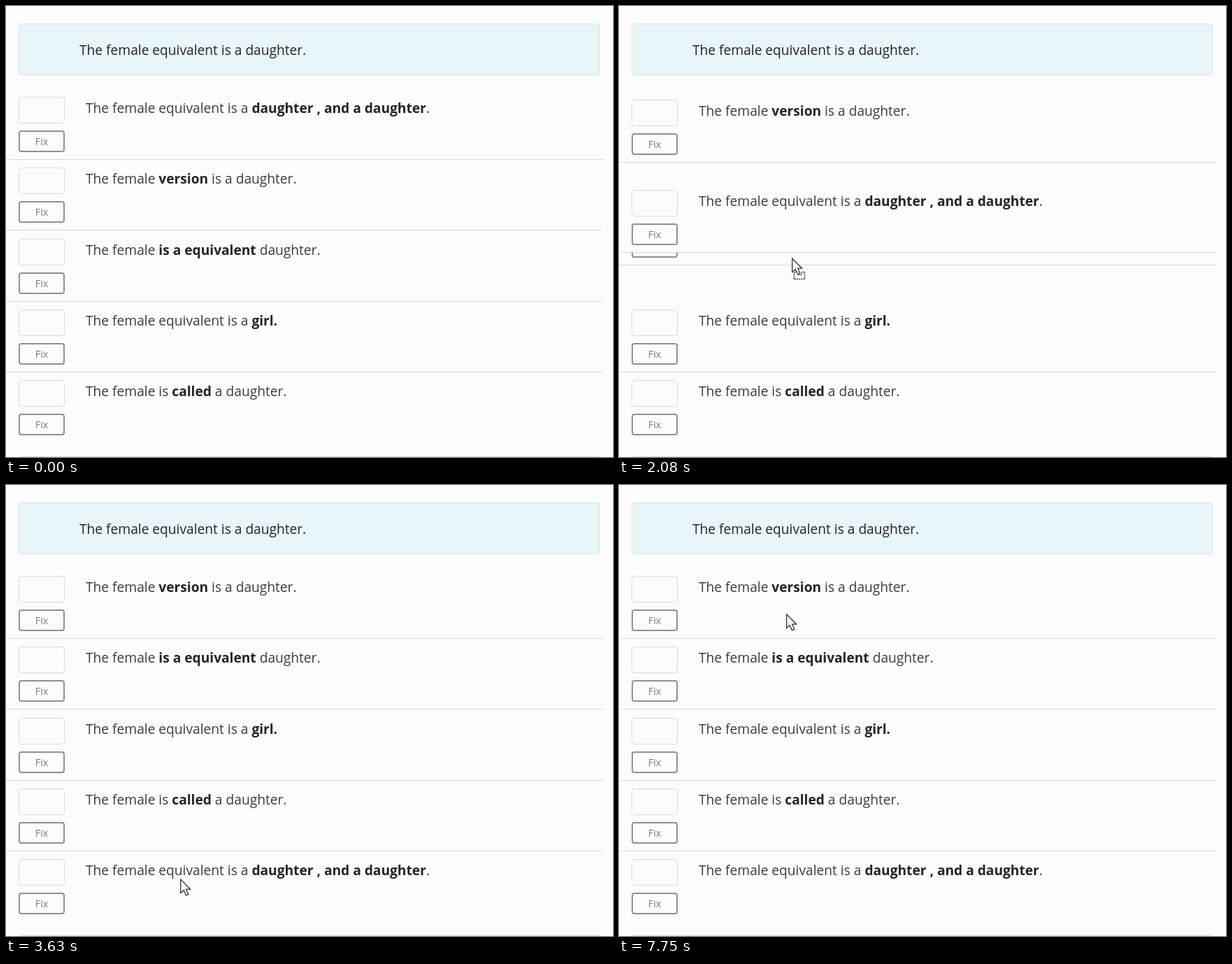
These frames come from a looping animation (868 px wide and 645 px high, 8 s). An HTML page:

```html
<!DOCTYPE html>
<html lang="en">
<head>
<meta charset="utf-8">
<title>Sortable sentences</title>
<style>
  html, body { margin: 0; width: 100%; height: 100%; overflow: hidden; background: #fcfcfc; }
  #stage {
    position: relative; width: 868px; height: 645px; overflow: hidden;
    font: 19.17px/28px "Open Sans", "Noto Sans", sans-serif; color: #3a3d41; white-space: pre;
  }
  #stage * { position: absolute; box-sizing: border-box; }
  #stage b { position: static; color: #212529; }
  .panel {
    left: 18px; top: 25px; width: 831px; height: 74px;
    background: #e8f6f9; border: 1px solid #d9dfea; border-radius: 4px;
  }
  .panel span { left: 86px; top: 23px; color: #212529; }
  .row {
    left: 0; top: 119px; width: 854px; height: 101px;
    background: #fcfcfc; border-bottom: 1px solid #d9d9d9;
  }
  .row.last { border-color: transparent; }
  .row span { left: 114px; top: 13px; }
  .row i, .row u { left: 18px; width: 66px; border-radius: 4px; }
  .row i { top: 11px; height: 38px; border: 1px solid #d8d9e6; }
  .row u {
    top: 59px; height: 31px; border: 2px solid #8d9097;
    font-size: 14.3px; line-height: 28px; color: #7c7c7c; text-align: center; text-decoration: none;
  }
  .end { left: 20px; top: 644px; width: 828px; height: 1px; background: #d8d8d6; }
  #cursor { left: 0; top: 0; z-index: 2; overflow: visible; }
</style>
</head>
<body>
<div id="stage">
  <div class="panel"><span>The female equivalent is a daughter.</span></div>
  <div class="end"></div>
  <svg id="cursor" width="20" height="32">
    <path id="arrow" d="M.7 1V20.5L5.3 16.5 8.5 23.8 11.8 22.4 8.7 15.2H14.6Z" fill="#fff" stroke="#333" stroke-width="1.3"/>
    <path id="drop" d="M3.5 20.5H7L9 24.5H13L15 20.5H18.5V30.5H3.5Z" fill="#fff" stroke="#222" stroke-width="1.6" stroke-dasharray="1.6 1.2"/>
    <path id="beam" d="M-4.5 -8.5H-1.5L0 -7.5 1.5 -8.5H4.5M0 -7.5V8M-4.5 9H-1.5L0 8 1.5 9H4.5" fill="none" stroke="#333" stroke-width="1.4"/>
  </svg>
</div>
<script>
const LOOP = 8000, PITCH = 101.35, SLIDE = 150;
const $ = id => document.getElementById(id);
const stage = $("stage"), cursor = $("cursor");

const sentences = [
  "The female equivalent is a <b>daughter , and a daughter</b>.",
  "The female <b>version</b> is a daughter.",
  "The female <b>is a equivalent</b> daughter.",
  "The female equivalent is a <b>girl.</b>",
  "The female is <b>called</b> a daughter."
];
const rows = sentences.map((html, i) => {
  const row = document.createElement("div");
  row.className = "row";
  row.style.zIndex = i ? 0 : 1;
  row.innerHTML = `<i></i><u>Fix</u><span>${html}</span>`;
  stage.insertBefore(row, cursor);
  return row;
});

// Moments at which the dragged row trades places with the next one
const swaps = [1970, 2036, 2254, 2470];
// The second trade interrupts the first slide
const dragFrom = [0, .58, 2, 3];

// time, x, y, cursor kind until the next point
const path = [
  [0, 252, 60, ""],
  [330, 252, 60, "beam"],
  [470, 249, 78, "arrow"],
  [760, 248, 130, "beam"],
  [1040, 250, 155, "beam"],
  [1630, 250, 155, "beam"],
  [1700, 250, 160, "drop"],
  [1850, 249, 188, "drop"],
  [1970, 248, 245, "drop"],
  [2034, 247, 325, "drop"],
  [2080, 247, 360, "drop"],
  [2200, 246, 402, "drop"],
  [2330, 246, 472, "drop"],
  [2420, 247, 522, "drop"],
  [2520, 248, 548, "drop"],
  [2720, 249, 563, "drop"],
  [3000, 249, 563, "arrow"],
  [3790, 249, 563, "arrow"],
  [3920, 248, 525, "arrow"],
  [4300, 240, 265, "arrow"],
  [4450, 237, 208, "arrow"],
  [4580, 236, 190, "arrow"],
  [4630, 236, 190, "arrow"],
  [4760, 237, 168, "beam"],
  [4880, 238, 157, "beam"],
  [6250, 238, 157, "beam"],
  [6340, 238, 168, "arrow"],
  [6460, 237, 188, "arrow"],
  [7080, 237, 188, "arrow"],
  [7380, 233, 210, "arrow"],
  [7540, 233, 210, "arrow"],
  [7750, 239, 184, "arrow"],
  [LOOP, 239, 184, "arrow"]
];

const mix = (a, b, p) => a + (b - a) * p;

// The CSS "ease" curve: cubic-bezier(.25, .1, .25, 1)
function ease(x) {
  if (x <= 0) return 0;
  if (x >= 1) return 1;
  const curve = (a, b, s) => 3 * a * s * (1 - s) ** 2 + 3 * b * s * s * (1 - s) + s ** 3;
  let lo = 0, hi = 1;
  for (let i = 0; i < 20; i++) {
    const mid = (lo + hi) / 2;
    if (curve(.25, .25, mid) < x) lo = mid; else hi = mid;
  }
  return curve(.1, 1, lo);
}

function slot(i, t) {
  if (i) return i - ease((t - swaps[i - 1]) / SLIDE);
  const k = swaps.findLastIndex(s => t >= s);
  return k < 0 ? 0 : mix(dragFrom[k], k + 1, ease((t - swaps[k]) / SLIDE));
}

function draw(t) {
  rows.forEach((row, i) => {
    row.style.transform = `translateY(${Math.round(slot(i, t) * PITCH)}px)`;
    row.classList.toggle("last", i === (t < swaps[3] ? 4 : 0));
  });

  const n = path.findIndex(p => p[0] > t);
  const [t0, x0, y0, kind] = path[n - 1], [t1, x1, y1] = path[n];
  const p = (t - t0) / (t1 - t0);
  cursor.style.transform = `translate(${Math.round(mix(x0, x1, p))}px, ${Math.round(mix(y0, y1, p))}px)`;
  const show = (id, on) => $(id).style.display = on ? "" : "none";
  show("arrow", kind === "arrow" || kind === "drop");
  show("drop", kind === "drop");
  show("beam", kind === "beam");
}

const start = performance.now();
function tick() {
  draw((performance.now() - start) % LOOP);
  requestAnimationFrame(tick);
}
tick();
</script>
</body>
</html>
```
